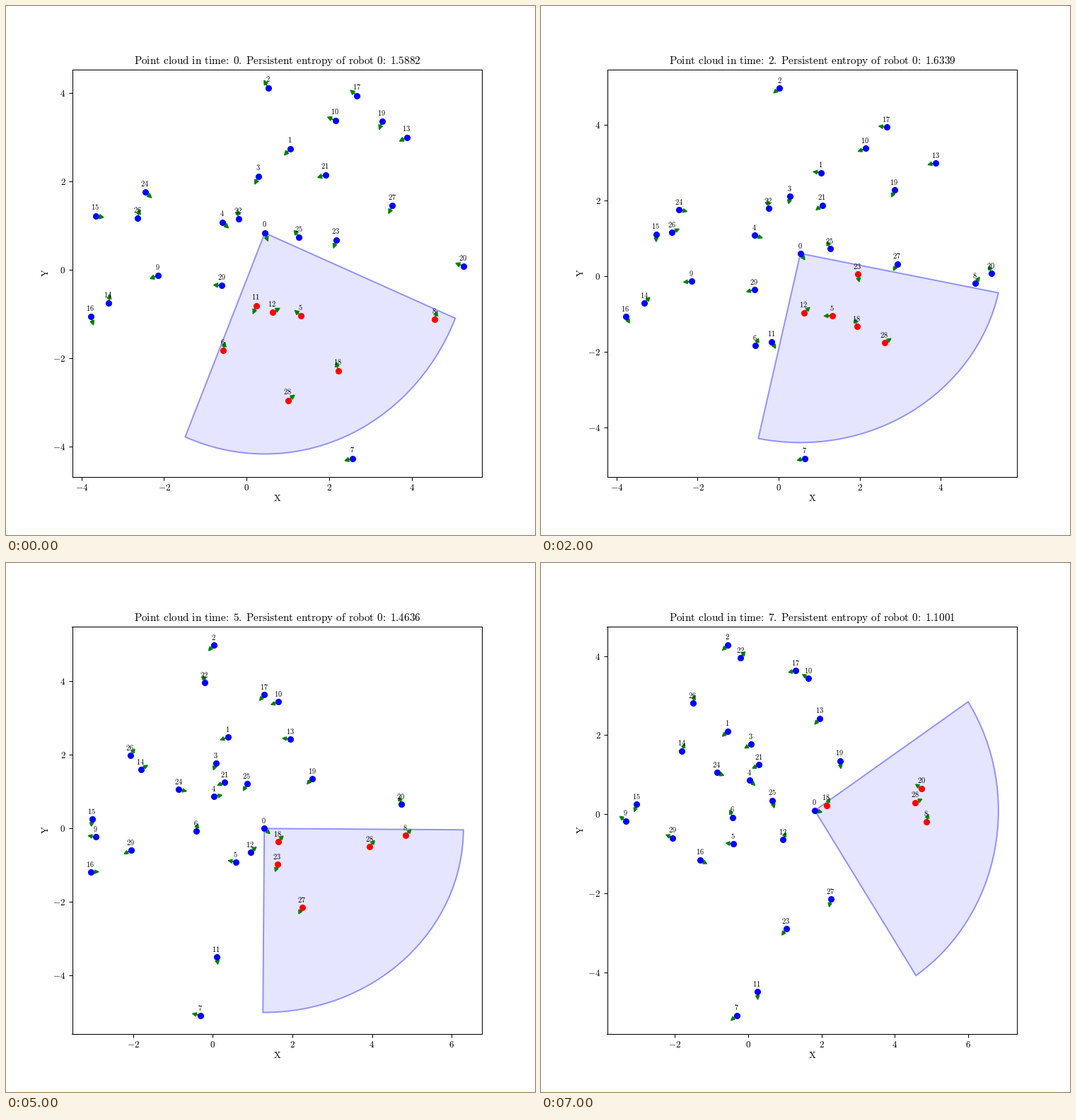
These frames come from a looping animation (748x748 px, 8 s). A matplotlib script:

```python
import numpy as np
import matplotlib.pyplot as plt
from matplotlib.animation import FuncAnimation
from matplotlib.patches import Wedge
from matplotlib.ticker import MultipleLocator

plt.rcParams["mathtext.fontset"] = "cm"

SIZE, DPI = 748, 93.5
VIEW_RADIUS, HALF_ANGLE = 5, 45
STEPS, SPEED, SWAY = 8, 1, 30

KEY_TIMES = [0, 1, 3, 5, 6, 7]
GAZE = [-67.7, -24.4, -89.6, -45.4, 12, -11.6]
ENTROPY = [1.5882, 1.9326, 1.3352, 1.4636, 1.3462, 1.1001]

routes = []


def robot(x, y, *stops):
    """Start at (x, y), then reach each stop (time, x, y)."""
    routes.append([(0, x, y), *stops])


robot(.44, .835, (1, .537, .603), (3, 1.298, .202), (5, 1.296, -.01),
      (7, 1.819, .092))
robot(1.05, 2.74, (6, -.55, 2.1))
robot(.52, 4.113, (1, .025, 4.978), (6, -.55, 4.28))
robot(.285, 2.115, (5, .08, 1.77))
robot(-.59, 1.08, (3, .04, .86))
robot(1.32, -1.04, (6, -.4, -.75))
robot(-.57, -1.83, (5, -.42, -.08))
robot(2.567, -4.262, (3, -.313, -5.088))
robot(4.55, -1.125, (1, 4.85, -.19))
robot(-2.15, -.13, (3, -2.93, -.24), (6, -3.33, -.17))
robot(2.145, 3.38, (5, 1.65, 3.43))
robot(.233, -.81, (1, -.17, -1.73), (6, .25, -4.49))
robot(.625, -.96, (3, .95, -.65))
robot(3.88, 3, (3, 2.95, 2.76), (5, 1.95, 2.42))
robot(-3.345, -.75, (3, -2.67, .06), (5, -1.8, 1.6))
robot(-3.66, 1.22, (1, -3.024, 1.115), (3, -3.03, .25))
robot(-3.775, -1.06, (3, -3.6, -1.39), (5, -3.06, -1.19), (7, -1.3, -1.16))
robot(2.67, 3.94, (3, 2.17, 4.02), (5, 1.3, 3.63))
robot(2.22, -2.28, (1, 1.935, -1.32), (5, 1.64, -.36), (6, 2.14, .22))
robot(3.28, 3.36, (3, 2.5, 1.35))
robot(5.25, .082, (5, 4.73, .65))
robot(1.91, 2.15, (1, 1.08, 1.88), (3, .3, 1.25))
robot(-.2, 1.15, (3, -.33, 2.8), (5, -.2, 3.95))
robot(2.17, .68, (1, 1.95, .05), (7, 1.04, -2.9))
robot(-2.455, 1.76, (3, -1.835, 1.61), (5, -.85, 1.05))
robot(1.27, .735, (5, .86, 1.2), (7, .66, .35))
robot(-2.635, 1.165, (6, -1.5, 2.81))
robot(3.53, 1.45, (1, 3.05, .55), (3, 2.45, -.55), (5, 2.25, -2.15))
robot(1, -2.95, (3, 3.42, -1.17), (6, 4.555, .297))
robot(-.6, -.355, (3, -1.4, -.58), (5, -2.05, -.6))


def unit(deg):
    rad = np.radians(deg)
    return np.stack([np.cos(rad), np.sin(rad)], axis=-1)


def wrap(deg):
    return (deg + 180) % 360 - 180


def bearing(offset):
    return np.degrees(np.arctan2(offset[..., 1], offset[..., 0]))


def travel(index, t):
    """Wait as long as possible before each leg; look around while waiting."""
    route = routes[index]
    pos = np.array(route[0][1:], float)
    for (begin, *a), (arrive, *b) in zip(route, route[1:]):
        leg = np.subtract(b, a)
        depart = max(begin, arrive - np.hypot(*leg) / SPEED)
        pos += leg * np.clip((t - depart) / (arrive - depart), 0, 1)
        heading = bearing(leg)
        if t < arrive:
            break
    if not depart - 1 < t < arrive:
        heading += SWAY * np.sin(2 * t + index)
    return pos, heading


def pose(t):
    pos, heading = map(np.array, zip(*(travel(i, t)
                                       for i in range(len(routes)))))
    heading[0] = np.interp(t, KEY_TIMES, GAZE)
    return pos, heading


def roman(text):
    words = text.split()
    out = ""
    for i, word in enumerate(words):
        out += rf"\text{{{word}}}"
        if i < len(words) - 1:
            out += r"\hspace{0.506}" if word[-1] in ":." else r"\hspace{0.38}"
    return f"${out}$"


def tick_label(value, _):
    sign = "-" if value < 0 else ""
    return rf"${sign}\mathrm{{{abs(round(value))}}}$"


def limits(values):
    low, high = values.min(), values.max()
    pad = .05 * (high - low)
    return low - pad, high + pad


fig, ax = plt.subplots(figsize=(SIZE / DPI, SIZE / DPI), dpi=DPI)
centred = dict(ha="center", va="center", fontsize=10)
fig.text(383.4 / SIZE, 1 - 696.3 / SIZE, roman("X"), **centred)
fig.text(56.3 / SIZE, 1 - 377.5 / SIZE, roman("Y"), rotation=90, **centred)


def draw(t):
    pos, heading = pose(t)
    eye, gaze = pos[0], heading[0]
    ax.clear()

    ax.add_patch(Wedge(eye, VIEW_RADIUS, gaze - HALF_ANGLE, gaze + HALF_ANGLE,
                       fc=(0, 0, 1, .1), ec=(0, 0, 1, .4), lw=1.5))
    for (x, y), (dx, dy) in zip(pos, .1 * unit(heading)):
        ax.arrow(x, y, dx, dy, head_width=.1, head_length=.1, color="green")

    offset = pos - eye
    seen = (np.abs(wrap(bearing(offset) - gaze)) < HALF_ANGLE) \
        & (np.hypot(*offset.T) < VIEW_RADIUS)
    seen[0] = False
    ax.plot(*pos[~seen].T, "o", color="blue")
    ax.plot(*pos[seen].T, "o", color="red")
    for i, (x, y) in enumerate(pos):
        ax.text(x - .01, y + .135, roman(str(i)), fontsize=8, ha="center",
                va="baseline")

    arc = eye + VIEW_RADIUS * unit(
        gaze + np.linspace(-HALF_ANGLE, HALF_ANGLE, 181))
    extent = np.vstack([pos, arc])
    ax.set_xlim(limits(extent[:, 0]))
    ax.set_ylim(limits(extent[:, 1]))
    for axis in (ax.xaxis, ax.yaxis):
        axis.set_major_locator(MultipleLocator(2))
        axis.set_major_formatter(tick_label)
    entropy = np.interp(t, KEY_TIMES, ENTROPY)
    ax.set_title(roman(f"Point cloud in time: {t}. Persistent entropy of "
                       f"robot 0: {entropy:.4f}"), fontsize=11.7)
    return []


anim = FuncAnimation(fig, draw, frames=STEPS, interval=1000, repeat=True,
                     repeat_delay=0)
plt.show()
```
